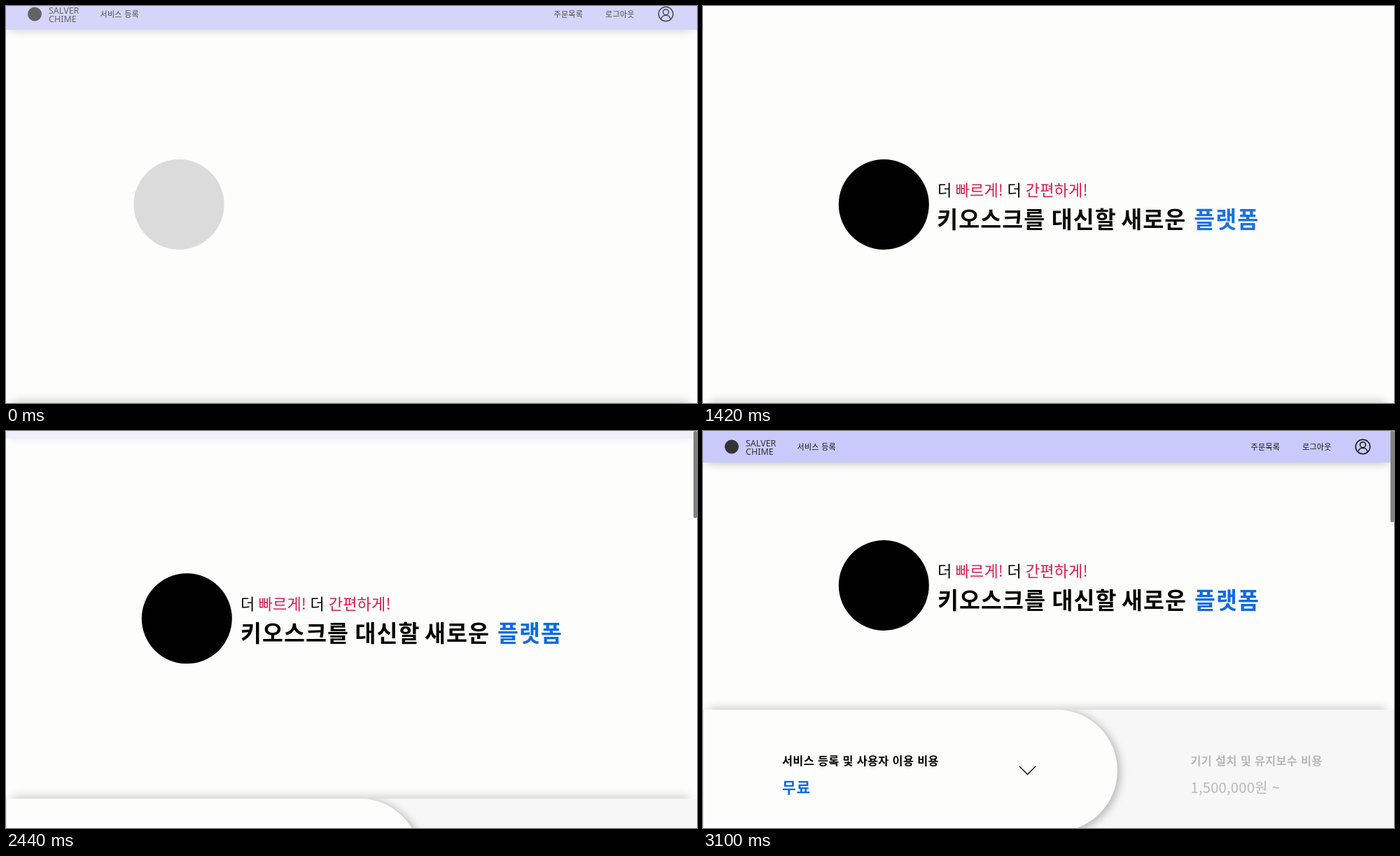
An HTML page for the animation above (3120 ms loop, 987 by 567 pixels).

```html
<!DOCTYPE html>
<html lang="ko">
<head>
<meta charset="utf-8">
<style>
  html, body { margin: 0; width: 100%; height: 100%; overflow: hidden; background: #fdfdfc; }
  svg { display: block; width: 987px; height: 567px; font-family: "Noto Sans CJK KR", "Noto Sans CJK", "Noto Sans KR", sans-serif; }
  .brand { font: 12.5px "Noto Sans", sans-serif; fill: #333; }
  .menu { font-size: 11px; font-weight: 500; letter-spacing: .3px; fill: #111; }
  .slogan { font-size: 22px; font-weight: 300; letter-spacing: .2px; }
  .title { font-size: 32.5px; font-weight: 700; letter-spacing: 1.1px; }
  .head { font-size: 16.3px; font-weight: 700; letter-spacing: .35px; }
  .price { font-size: 20px; letter-spacing: .3px; }
  .free { font-size: 21.5px; font-weight: 700; letter-spacing: .8px; }
  .red { fill: #da1b4c; }
  .blue { fill: #0d6ce0; }
  .muted { fill: #b8b8b8; }
  .line { fill: none; stroke: #111; stroke-width: 1.5; }
</style>
</head>
<body>
<svg viewBox="0 0 987 567">
  <defs>
    <filter id="soft" x="-10%" y="-40%" width="120%" height="180%">
      <feGaussianBlur stdDeviation="6.5"/>
    </filter>
    <clipPath id="card"><rect width="987" height="174"/></clipPath>
  </defs>
  <rect width="987" height="567" fill="#fdfdfc"/>

  <g id="hero">
    <circle id="mark" cx="258.3" cy="283.5" r="64.5"/>
    <g id="slogan" class="slogan">
      <text x="335" y="271">더</text>
      <text x="360.5" y="271" class="red">빠르게!</text>
      <text x="434.5" y="271">더</text>
      <text x="460.7" y="271" class="red">간편하게!</text>
    </g>
    <g id="title" class="title">
      <text x="335" y="317">키오스크를</text>
      <text x="498.5" y="317">대신할</text>
      <text x="598" y="317">새로운</text>
      <text x="702" y="317" class="blue">플랫폼</text>
    </g>
  </g>

  <g id="costs">
    <rect x="9" y="-3" width="966" height="172" opacity=".19" filter="url(#soft)"/>
    <rect width="987" height="174" fill="#f7f7f7"/>
    <g clip-path="url(#card)">
      <path d="M0 2H508A87 87 0 0 1 508 176H0Z" opacity=".3" filter="url(#soft)"/>
    </g>
    <path d="M0 0H505A87 87 0 0 1 505 174H0Z" fill="#fdfdfc"/>
    <path d="M.5 0V174" stroke="#e4e4e4"/>
    <text x="113" y="79" class="head">서비스 등록 및 사용자 이용 비용</text>
    <text x="113" y="119" class="free blue">무료</text>
    <path d="M452 81L463.5 92.5L475 81" class="line"/>
    <text x="696.5" y="79" class="head muted">기기 설치 및 유지보수 비용</text>
    <text x="696.5" y="118.5" class="price muted">1,500,000원 ~</text>
  </g>

  <g id="nav">
    <rect x="5" y="4" width="974" height="42" opacity=".25" filter="url(#soft)"/>
    <rect width="987" height="45" fill="#c9c9fb"/>
    <circle cx="41" cy="22.5" r="10" fill="#333"/>
    <text x="61" y="21.5" class="brand">SALVER</text>
    <text x="61" y="34" class="brand">CHIME</text>
    <text x="134.5" y="27" class="menu">서비스 등록</text>
    <text x="782.5" y="27" class="menu">주문목록</text>
    <text x="856" y="27" class="menu">로그아웃</text>
    <g class="line">
      <circle cx="942.5" cy="22.5" r="10.3"/>
      <circle cx="942.5" cy="19.7" r="4"/>
      <path d="M935.6 30A7 7 0 0 1 949.4 30"/>
    </g>
  </g>

  <rect id="thumb" x="982" y="0" width="5" rx="2.5" fill="#808080"/>
</svg>
<script>
  const LOOP = 3120, SCROLL = 2137, SLIDE = 880, FADE = 600;
  const el = id => document.getElementById(id);
  const clamp = v => Math.min(1, Math.max(0, v));

  // CSS-style cubic bezier, solved by bisection
  function bezier(x1, y1, x2, y2) {
    const at = (a, b, s) => 3 * a * s * (1 - s) ** 2 + 3 * b * s * s * (1 - s) + s ** 3;
    return x => {
      if (x <= 0) return 0;
      if (x >= 1) return 1;
      let lo = 0, hi = 1;
      for (let i = 0; i < 24; i++) {
        const mid = (lo + hi) / 2;
        if (at(x1, x2, mid) < x) lo = mid; else hi = mid;
      }
      return at(y1, y2, lo);
    };
  }
  const ease = bezier(.25, .1, .25, 1);
  const easeInOut = bezier(.42, 0, .58, 1);

  const reveals = [["mark", -73], ["slogan", 490], ["title", 990]];

  function place(id, x, y, opacity = 1) {
    el(id).setAttribute("transform", `translate(${x} ${y})`);
    el(id).setAttribute("opacity", opacity);
  }

  function draw(t) {
    for (const [id, start] of reveals) {
      const p = ease(clamp((t - start) / FADE));
      place(id, -13 * (1 - p), 0, p);
    }
    const p = easeInOut((t - SCROLL) / SLIDE);
    const shown = t < SCROLL ? 1 - easeInOut((t + 300) / SLIDE) : p;
    place("hero", 0, -63 * p);
    place("costs", 0, 567 - 169 * p);
    place("nav", 0, -45 * (1 - shown), shown);
    el("thumb").setAttribute("height", 122.6 + 7.6 * p);
    el("thumb").setAttribute("opacity", t < SCROLL ? 0 : 1);
  }

  const begin = performance.now();
  function tick() {
    draw((performance.now() - begin) % LOOP);
    requestAnimationFrame(tick);
  }
  tick();
</script>
</body>
</html>
```
